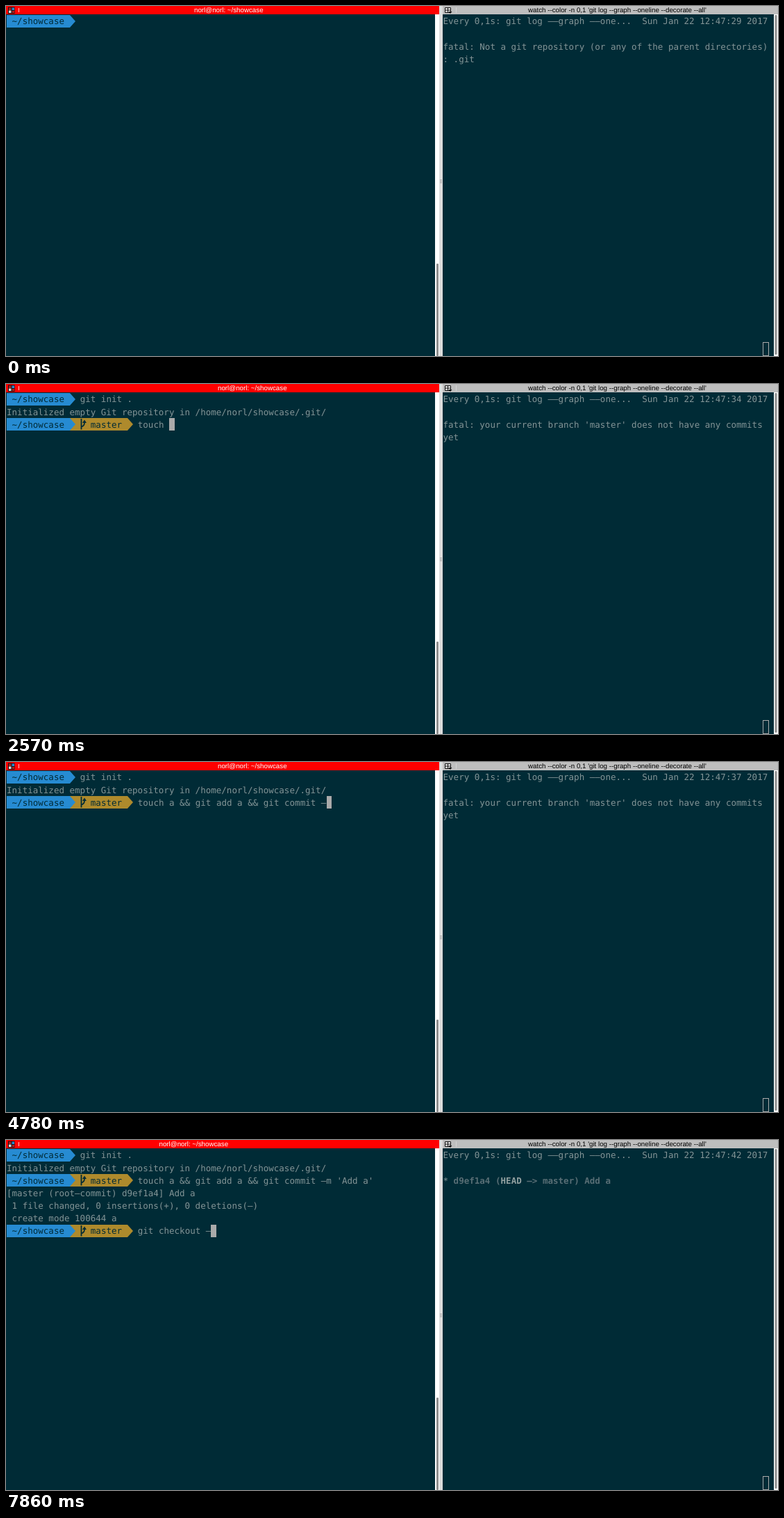
Recreate the animation shown at these times as an HTML page. Size 1112 by 504 pixels, loop 8 s.

```html
<!DOCTYPE html>
<html lang="en">
<head>
<meta charset="utf-8">
<title>Git showcase</title>
<style>
  html, body { margin: 0; height: 100%; overflow: hidden; background: #002b36; }
  svg { display: block; width: 1112px; height: 504px; }
  text { white-space: pre; text-rendering: geometricPrecision; }
  .term { font: 12.54px "DejaVu Sans Mono", monospace; }
  .bold { font-weight: 700; }
  .title { font: 9.75px "Liberation Sans", Arial, sans-serif; }
</style>
</head>
<body>
<svg viewBox="0 0 1112 504">
  <rect width="1112" height="504" fill="#002b36"/>

  <!-- left pane -->
  <rect width="624" height="12" fill="#f00"/>
  <rect x="618" y="12" width="7" height="492" fill="#fff"/>
  <rect x="620" y="371" width="3" height="133" rx="1" fill="#8c8c8c"/>
  <path d="M3 1.5h9.500v9.500H3z" fill="#111"/>
  <path d="M4 6.500h3.500V10H4z" fill="#ddd"/>
  <path d="M8.500 2.500H12V6H8.500z" fill="#268bd2"/>
  <path d="M4 2.500h3.500V6H4zM8.500 7H12v3H8.500z" fill="#a22"/>
  <path d="M18.500 3v6" stroke="#fcc"/>

  <!-- divider -->
  <rect x="624" width="5" height="504" fill="#dcdcdc"/>
  <path d="M625 250.500h3m-3 2h3m-3 2h3" stroke="#999" stroke-width=".8"/>

  <!-- right pane -->
  <rect x="629" width="483" height="12" fill="#bebebe"/>
  <rect x="1106" y="12" width="6" height="492" fill="#fff"/>
  <rect x="1107.500" y="13" width="3" height="489" rx="1" fill="#8c8c8c"/>
  <path d="M632.500 2.500h8v7h-8zM636.500 2.500v7M632.500 6h8" fill="#eee" stroke="#111"/>
  <path d="M637.500 8h5l-2.500 3z" fill="#111"/>
  <path d="M648.500 2v8" stroke="#d4d4d4"/>
  <text class="title" x="752" y="8.7">watch --color -n 0,1 'git log --graph --oneline --decorate --all'</text>
  <rect x="1090.500" y="484.500" width="8" height="19" fill="none" stroke="#aaa"/>

  <g id="screen"></g>
</svg>
<script>
const LOOP = 8000, COL = 7.55, ROW = 18.17, TOP = 12.6, LEFT = 1, RIGHT = 629.5;
const FG = '#839496', DARK = '#002b36', BLUE = '#268bd2', GOLD = '#ae8a2c', DIM = '#586e75';
const screen = document.getElementById('screen');

// Each burst: first key time, last key time, number of keys
const commands = [
  { text: 'git init .', bursts: [[400, 530, 3], [700, 1070, 7]] },
  { text: "touch a && git add a && git commit -m 'Add a'",
    bursts: [[2300, 2570, 6], [2750, 2750, 1], [2930, 3350, 7], [3400, 3700, 7],
             [3780, 3990, 3], [4220, 4780, 12], [4850, 5020, 3], [5280, 5670, 6]] },
  { text: 'git checkout -', bursts: [[6410, 6740, 6], [7110, 7230, 3], [7430, 7540, 3], [7800, 7860, 2]] },
];
const blinks = [[0, 400], [1460, 1860], [2250, 2300], [6250, 6410], [7050, 7110]];

function typed({ text, bursts }, t) {
  let n = 0;
  for (const [from, to, keys] of bursts)
    if (t >= from) n += Math.min(keys, 1 + Math.floor((t - from) * (keys - 1) / (to - from || 1)));
  return text.slice(0, n);
}

// Cell edges in the left terminal lie on whole pixels
const cellX = col => Math.round(LEFT + col * COL);
const cellY = row => Math.round(TOP + row * ROW);

// The terminal draws hyphens as wide dashes
function write(x0, row, col, str, fill = FG, cls = '') {
  const safe = str.replace(/&/g, '&amp;').replace(/>/g, '&gt;').replace(/-/g, '–');
  return `<text class="term ${cls}" x="${x0 + col * COL}" y="${TOP + row * ROW + 13.8}" fill="${fill}">${safe}</text>`;
}

function segment(row, from, to, fill) {
  const x = cellX(from), end = cellX(to), y = cellY(row), bottom = cellY(row + 1);
  return `<path d="M${x} ${y}H${end}L${cellX(to + 1) + 1} ${(y + bottom) / 2}L${end} ${bottom}H${x}z" fill="${fill}"/>`;
}

function prompt(row, branch) {
  let out = '';
  if (branch) {
    const x = cellX(14), y = cellY(row);
    out += segment(row, 12, 23, GOLD) + write(LEFT, row, 16, 'master', DARK) +
      `<path d="M${x + 1.5} ${y + 1}v15.500M${x + 1.5} ${y + 12.5}q4.500 -1 4.500 -6" fill="none" stroke="${DARK}" stroke-width="1.800"/>` +
      `<path d="M${x + 3} ${y + 7}l3 -4.500 3 4.500z" fill="${DARK}"/>`;
  }
  return out + segment(row, 0, 12, BLUE) + write(LEFT, row, 1, '~/showcase', DARK);
}

function leftPane(t) {
  const [init, commit, checkout] = commands.map(c => typed(c, t));
  const titleX = t < 1160 ? 271 : t < 5890 ? 305 : 220.5;
  let out = `<text class="title" x="${titleX}" y="8.7" fill="#fff">norl@norl: ~/showcase</text>`;
  let row = 0, col = 14 + init.length;
  out += prompt(0) + write(LEFT, 0, 14, init);
  if (t >= 1110) [row, col] = [1, 0];
  if (t >= 1160) {
    out += write(LEFT, 1, 0, 'Initialized empty Git repository in /home/norl/showcase/.git/');
    row = 2;
  }
  if (t >= 1220) {
    out += prompt(2, true) + write(LEFT, 2, 25, commit);
    col = 25 + commit.length;
  }
  if (t >= 5870) [row, col] = [3, 0];
  if (t >= 5890) {
    out += write(LEFT, 3, 0, '[master (root-commit) d9ef1a4] Add a') +
      write(LEFT, 4, 1, '1 file changed, 0 insertions(+), 0 deletions(-)') +
      write(LEFT, 5, 1, 'create mode 100644 a');
    row = 6;
  }
  if (t >= 5950) {
    out += prompt(6, true) + write(LEFT, 6, 25, checkout);
    col = 25 + checkout.length;
  }
  if (!blinks.some(([from, to]) => t >= from && t < to)) {
    const x = cellX(col), y = cellY(row);
    out += `<rect x="${x}" y="${y}" width="${cellX(col + 1) - x}" height="${cellY(row + 1) - y}" fill="#aaa"/>`;
  }
  return out;
}

function rightPane(t) {
  const sec = 30 + Math.floor((t - 60) / 619);
  const out = write(RIGHT, 0, 0, `Every 0,1s: git log --graph --one...  Sun Jan 22 12:47:${sec} 2017`);
  if (t >= 5950)
    return out + write(RIGHT, 2, 0, '*') + write(RIGHT, 2, 2, 'd9ef1a4 (', DIM, 'bold') +
      write(RIGHT, 2, 11, 'HEAD', '#93a1a1', 'bold') + write(RIGHT, 2, 16, '-> master) Add a', DIM, 'bold');
  const lines = t < 1290
    ? ['fatal: Not a git repository (or any of the parent directories)', ': .git']
    : ["fatal: your current branch 'master' does not have any commits", 'yet'];
  return out + lines.map((line, i) => write(RIGHT, 2 + i, 0, line)).join('');
}

let shown = '';
function frame() {
  const t = performance.now() % LOOP, picture = leftPane(t) + rightPane(t);
  if (picture !== shown) screen.innerHTML = shown = picture;
  requestAnimationFrame(frame);
}
frame();
</script>
</body>
</html>
```
